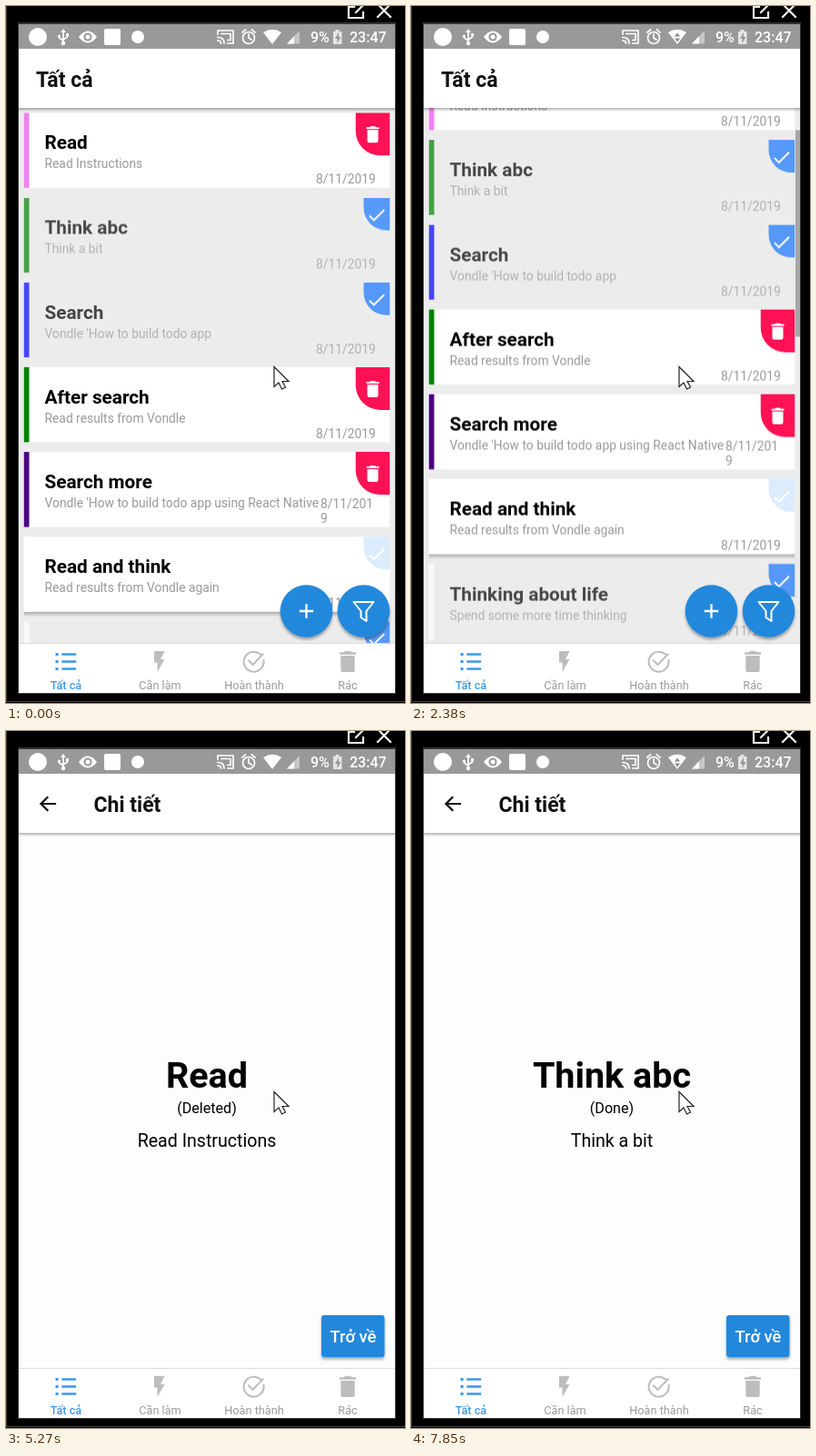
An HTML page that plays this animation: 439 px wide and 766 px high, repeating every 8000 ms.

```html
<!DOCTYPE html>
<html lang="vi">
<head>
<meta charset="utf-8">
<title>Todo</title>
<style>
  html, body { margin: 0; width: 100%; height: 100%; overflow: hidden; background: #000; }
  svg { display: block; width: 439px; height: 766px; font-family: Roboto, sans-serif; }
  .bold { font-weight: 700; }
  .medium { font-weight: 500; }
  .mid { text-anchor: middle; }
  .small { font-size: 13.83px; fill: #999; }
  .line { fill: none; stroke-linecap: square; }
</style>
</head>
<body>
<svg viewBox="0 0 439 766">
  <defs>
    <clipPath id="listArea"><rect x="14" y="112" width="414" height="588"/></clipPath>
    <linearGradient id="fade" x2="0" y2="1">
      <stop stop-color="#000" stop-opacity=".3"/><stop offset="1" stop-color="#000" stop-opacity="0"/>
    </linearGradient>
    <filter id="shadow" x="-20%" y="-20%" width="140%" height="150%">
      <feDropShadow dx="0" dy="2.5" stdDeviation="1.8" flood-opacity=".35"/>
    </filter>
    <path id="trash" d="M-6 7a2 2 0 0 0 2 2h8a2 2 0 0 0 2-2V-5H-6zM7-8H3.5l-1-1h-5l-1 1H-7v2H7z"/>
    <path id="check" d="M-3.2 3.9L-7.4-.3l-1.4 1.4 5.6 5.6L8.8-5.3 7.4-6.700z"/>
  </defs>

  <rect width="439" height="766"/>
  <path d="M.5 0V764.5H439" fill="none" stroke="#444"/>
  <g class="line" stroke="#eee" stroke-width="2.2">
    <path d="M383 1h-6v12h16V7M385 7l8-8M409-2l14 14M423-2l-14 14"/>
  </g>
  <rect x="13" y="18" width="416" height="738" fill="#333"/>
  <rect x="14" y="20" width="414" height="735" fill="#ececec"/>

  <g clip-path="url(#listArea)">
    <g id="list"></g>
    <rect id="scrollbar" x="423" y="112" width="5" height="227" fill="#a6a6a6"/>
    <g id="fabs" filter="url(#shadow)">
      <circle cx="330.5" cy="665" r="28.8" fill="#2488dc"/>
      <circle cx="393.5" cy="665" r="28.8" fill="#2488dc"/>
      <g class="line" stroke="#fff" stroke-width="2.3">
        <path d="M324 665h13M330.5 658.5v13"/>
        <path d="M382.5 655h22l-8 10v11l-6-4v-7z" stroke-linejoin="round" stroke-width="2"/>
      </g>
    </g>
    <g id="details"></g>
  </g>

  <rect x="14" y="47" width="414" height="65" fill="#fff"/>
  <rect x="14" y="112" width="414" height="4" fill="url(#fade)"/>
  <text id="listTitle" class="bold" x="33" y="89" font-size="23" fill="#111">Tất cả</text>
  <g id="detailTitle">
    <path class="line" d="M54 80H38.5M45.5 73l-7 7 7 7" stroke="#111" stroke-width="2.2"/>
    <text class="bold" x="96.5" y="89" font-size="23" fill="#111">Chi tiết</text>
  </g>

  <g id="status">
    <rect x="14" y="20" width="414" height="27" fill="#999"/>
    <g fill="#fff">
      <circle cx="35" cy="34" r="10"/>
      <rect x="108" y="25" width="18" height="18" rx="2"/>
      <circle cx="145" cy="34" r="7"/>
      <path d="M63 25l3 4h-6z"/><circle cx="63" cy="41" r="2.2"/>
      <circle cx="58.5" cy="33" r="1.6"/><rect x="66" y="30" width="3" height="3"/>
      <path d="M80 34q10-13 20 0q-10 13-20 0z"/>
      <path d="M283 29q10-6.5 20 0L293 42z"/>
      <path d="M309 41.5L323 27v14.5z" opacity=".45"/>
      <path d="M309 41.5l8-8.300v8.300z"/>
      <path d="M360 28h2.500v-2h4v2h3v14H360z" opacity=".75"/>
    </g>
    <circle cx="90" cy="34" r="4.6" fill="#999"/><circle cx="90" cy="34" r="2.5" fill="#fff"/>
    <path d="M366 29l-4 7h2.500v5l4-7H366z" fill="#999"/>
    <g class="line" stroke="#fff" stroke-width="1.7">
      <path d="M63 28v13M58.5 33v2l4.500 3M67.5 32v2L63 37"/>
      <path d="M233 31v-4h17v14h-6M233 34.5q7 0 7 6.500M233 38q3.500 0 3.500 3"/>
      <path d="M237 30.5h10v7h-3"/>
      <circle cx="267" cy="35" r="6.5"/><path d="M267 31v4l3 2M260 29l3.500-3M274 29l-3.500-3"/>
    </g>
    <path id="wifiMark" d="M290 33.5l3-4 3 4zM290 35.5h6l-3 4z" fill="#8a8a8a"/>
    <g class="medium" fill="#fff" font-size="16">
      <text x="335" y="40">9%</text><text x="378" y="40">23:47</text>
    </g>
  </g>

  <g id="tabs">
    <rect x="14" y="700" width="414" height="55" fill="#fff"/>
    <path d="M14 700.5h414" stroke="#dcdcdc"/>
    <g class="line" stroke="#3b99ea" stroke-width="2.3">
      <path d="M62.5 712.5H76M62.5 720.5H76M62.5 728.5H76"/>
      <path d="M56 712.5h.1M56 720.5h.1M56 728.5h.1" stroke-width="3"/>
    </g>
    <path d="M163 709v12.500h3.500V732l8-14H170l4.500-9z" fill="#bdbdbd"/>
    <g class="line" stroke="#bdbdbd" stroke-width="2">
      <path d="M280 712.5a11 11 0 1 0 3.500 6.500M267 719.5l4.500 4.500 11-11.500"/>
    </g>
    <use href="#trash" transform="translate(376 720.5) scale(1.28)" fill="#bdbdbd"/>
    <g class="mid" font-size="12.7" fill="#9a9a9a">
      <text class="medium" x="66" y="751" fill="#3b99ea">Tất cả</text>
      <text x="169.5" y="751">Cần làm</text>
      <text x="273" y="751">Hoàn thành</text>
      <text x="376" y="751">Rác</text>
    </g>
  </g>

  <path id="cursor" d="M295 396.5v22l5-4.500 3.500 7 4-2-3.500-6.500h7z" fill="#fff" stroke="#222" stroke-width="1.2"/>
</svg>

<script>
const LOOP = 8000;
const PITCH = 93.2;
const LEFT = 19.75, RIGHT = 422.25, HEIGHT = 82.5;
const VIEW = 588, CONTENT = 1523;
const find = id => document.getElementById(id);

// kind: deleted (red corner), done (dimmed card), todo (pale corner)
const cards = [
  { title: 'Read', note: 'Read Instructions', color: '#ee82ee', kind: 'deleted' },
  { title: 'Think abc', note: 'Think a bit', color: '#008000', kind: 'done' },
  { title: 'Search', note: "Vondle 'How to build todo app", color: '#0000ff', kind: 'done' },
  { title: 'After search', note: 'Read results from Vondle', color: '#008000', kind: 'deleted' },
  { title: 'Search more', note: "Vondle 'How to build todo app using React Native", color: '#4b0082', kind: 'deleted', wrap: true },
  { title: 'Read and think', note: 'Read results from Vondle again', color: '#fff', kind: 'todo' },
  { title: 'Thinking about life', note: 'Spend some more time thinking', color: '#fff', kind: 'done' },
];

// A box against the right edge with one round corner at the bottom left.
const tab = (width, height, radius, fill) =>
  `<path d="M${RIGHT} 0v${height}h${radius - width}a${radius} ${radius} 0 0 1 ${-radius} ${-radius}V0z" fill="${fill}"/>`;

function corner(kind) {
  return kind === 'deleted'
    ? tab(37.5, 47, 27, '#ff1155') + '<use href="#trash" x="403.5" y="24" fill="#fff"/>'
    : tab(28.75, 36, 25, kind === 'done' ? '#1676ff' : '#dbecfd') +
      '<use href="#check" x="408" y="19.5" fill="#fff"/>';
}

function cardMarkup({ title, note, color, kind, wrap }, i) {
  const done = kind === 'done';
  const date = wrap
    ? '<text x="346" y="62">8/11/201</text><text x="346" y="78">9</text>'
    : '<text x="341" y="78">8/11/2019</text>';
  const shadow = kind === 'todo'
    ? `<rect x="${LEFT}" y="82" width="${RIGHT - LEFT}" height="6" fill="url(#fade)"/>` : '';
  return `<g transform="translate(0 ${117.3 + i * PITCH})"><g id="card${i}" opacity="${done ? .7 : 1}">
    ${shadow}
    <rect x="${LEFT}" width="${RIGHT - LEFT}" height="${HEIGHT}" fill="${done ? 'none' : '#fff'}"/>
    <rect x="${LEFT}" width="5.75" height="${HEIGHT}" fill="${color}"/>
    <g id="text${i}">
      <text class="bold" x="42.5" y="40" font-size="20.75">${title}</text>
      <text class="small" x="42.5" y="61">${note}</text>
    </g>
    <g class="small">${date}</g>
    ${corner(kind)}
  </g></g>`;
}

function detailMarkup(title, state, note, i) {
  return `<g id="detail${i}">
    <rect x="14" y="112" width="414" height="640" fill="#fdfdfd"/>
    <g class="mid">
      <text class="bold" x="221" y="391.5" font-size="39.5">${title}</text>
      <text x="221" y="420" font-size="16.1">(${state})</text>
      <text x="221" y="456.5" font-size="19.6">${note}</text>
    </g>
    <g filter="url(#shadow)"><rect x="347" y="642" width="69.5" height="46" rx="3" fill="#2488dc"/></g>
    <text class="mid medium" x="382" y="672" font-size="18.4" fill="#fff">Trở về</text>
  </g>`;
}

find('list').innerHTML = cards.map(cardMarkup).join('') +
  '<path id="swipeMark" d="M20.5 340l1.500 3M20.5 345l1.500 3M20.5 350l1.500 3" stroke="#555" stroke-width="1.5"/>';
find('details').innerHTML =
  detailMarkup('Read', 'Deleted', 'Read Instructions', 0) +
  detailMarkup('Think abc', 'Done', 'Think a bit', 1);

// Each step [time, value] holds until the next one.
function play(id, steps, toFrame) {
  const frames = steps.map(([time, value]) =>
    ({ offset: time / LOOP, easing: 'steps(1, end)', ...toFrame(value) }));
  frames.push({ ...frames[frames.length - 1], offset: 1 });
  find(id).animate(frames, { duration: LOOP, iterations: Infinity });
}
const opacity = value => ({ opacity: value });
const slideX = value => ({ transform: `translateX(${value}px)` });
const slideY = value => ({ transform: `translateY(${value}px)` });
const screen = ([alpha, y]) => ({ ...opacity(alpha), ...slideY(y) });

const scroll = [[0, 0], [1270, 23.4], [1420, 44], [1540, 60], [1690, 71], [1820, 77],
  [2380, 63.4], [2530, 22], [2680, 0]];
play('list', scroll, y => slideY(-y));
play('scrollbar', scroll, y => slideY(y * VIEW / CONTENT));
play('scrollbar', [[0, 0], [1270, 1], [2960, .55], [3080, 0]], opacity);
play('card2', [[0, 0], [1270, 2], [1420, 0]], slideX);
play('swipeMark', [[0, 0], [1270, 1], [1420, 0]], opacity);

play('text0', [[0, 1], [3080, .6], [3200, .2], [3930, 1]], opacity);
play('text1', [[0, 1], [7320, .25], [7850, 1]], opacity);

const hidden = [0, 0], shown = [1, 0], entering = [.92, 4], leaving = [.35, 22];
play('detail0', [[0, hidden], [3790, entering], [3930, shown], [6050, leaving], [6200, hidden]], screen);
play('detail1', [[0, hidden], [7700, entering], [7850, shown]], screen);
const header = [[0, 0], [3790, .92], [3930, 1], [6050, .35], [6200, 0], [7700, .92], [7850, 1]];
play('detailTitle', header, opacity);
play('listTitle', header, value => opacity(1 - value));

play('wifiMark', [[0, 0], [430, 1], [5270, 0], [6200, 1]], opacity);
</script>
</body>
</html>
```
